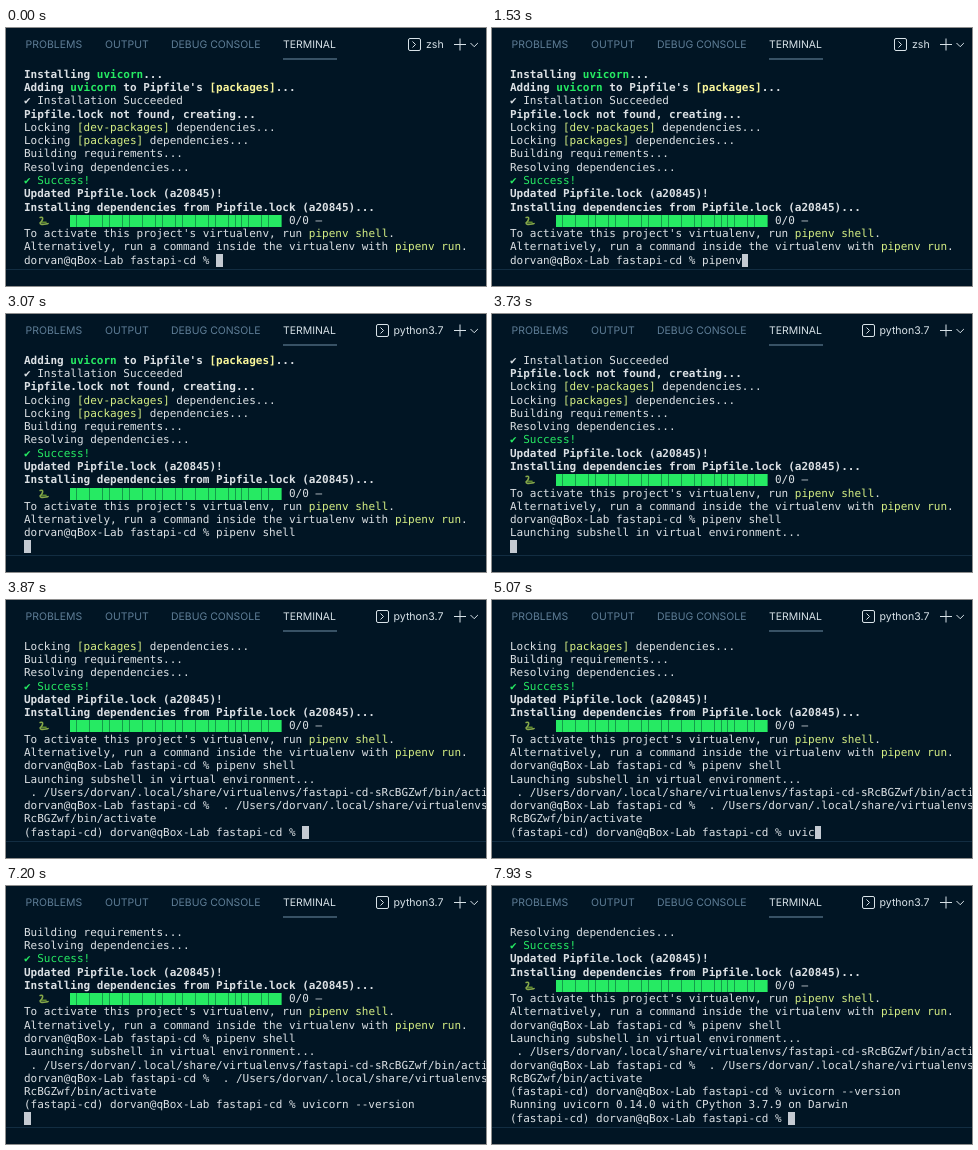
Recreate the animation shown at these times as an HTML page. Size 480 by 258 pixels, loop 8 s.

```html
<!DOCTYPE html>
<html lang="en">
<head>
<meta charset="utf-8">
<title>Terminal</title>
<style>
  html, body { margin: 0; width: 100%; height: 100%; overflow: hidden; background: #011524; }
  #stage {
    position: relative; width: 480px; height: 258px; overflow: hidden;
    background: #011524; color: #dbe0e4; text-rendering: geometricPrecision;
  }
  .tab, #shell {
    position: absolute; top: 9.5px; line-height: 14px; white-space: nowrap;
    font-family: Inter, "Open Sans", sans-serif; font-size: 10.45px; color: #5f7e97;
  }
  .tab.on, #shell { color: #d8e2e8; }
  #shell { font-size: 10.6px; }
  #icons { position: absolute; left: 0; top: 0; fill: none; stroke: #d8e2e8; }
  #screen {
    position: absolute; left: 18px; top: 39.7px; margin: 0;
    font: 11px/13.29px "DejaVu Sans Mono", monospace;
  }
  #screen div { height: 13.29px; white-space: pre; }
  i { font-style: normal; color: #26ea63; }
  u { text-decoration: none; color: #d5ee84; }
  b u { color: #f8f59a; }
  .bar, .snake, .cursor { display: inline-block; vertical-align: top; }
  .bar {
    width: 32ch; height: 12px; margin-top: 1px;
    background: repeating-linear-gradient(90deg, #26ea63 0 calc(1ch - .7px), #149a4a 0 1ch);
  }
  .snake { width: 2ch; height: 13px; }
  .cursor { width: 1ch; height: 13.29px; background: #c4cad2; }
  #rule { position: absolute; left: 0; top: 241px; width: 480px; height: 1px; background: #122d42; }
</style>
</head>
<body>
<div id="stage">
  <span class="tab" style="left:19.6px">PROBLEMS</span>
  <span class="tab" style="left:99px">OUTPUT</span>
  <span class="tab" style="left:165px">DEBUG CONSOLE</span>
  <span class="tab on" style="left:277px">TERMINAL</span>
  <svg id="icons" width="480" height="40">
    <path d="M277 31H331" stroke="#6f8ea6"/>
    <g id="box"><rect x=".5" y="10.5" width="12" height="12" rx="1.5"/><path d="M4.5 13.5l3 3-3 3"/></g>
    <path d="M448 16.5H460M454 10.5V22.5M464.5 15l3.7 3.7 3.7-3.7"/>
  </svg>
  <span id="shell"></span>
  <div id="screen"></div>
  <div id="rule"></div>
</div>
<script>
const LOOP = 8000, ROWS = 15;
const $ = id => document.getElementById(id);
const bold = s => `<b>${s}</b>`;
const green = s => `<i>${s}</i>`;
const yellow = s => `<u>${s}</u>`;

const prompt = 'dorvan@qBox-Lab fastapi-cd % ';
const envs = ' . /Users/dorvan/.local/share/virtualenvs/fastapi-cd-s';
const wrapped = 'RcBGZwf/bin/activate';
const snake = `<svg class="snake" viewBox="0 0 13 13" fill="none" stroke-linecap="round">
<path d="M3 3.5Q6 2.5 5.5 5T3 9Q3 10.8 7 10.3T11 9.5" stroke="#86a84a" stroke-width="1.6"/>
<path d="M5.5 8.3H9" stroke="#5f8a2e" stroke-width="1.4"/></svg>`.replace(/\n/g, '');

const start = [
  bold(`Installing ${green('uvicorn')}...`),
  bold(`Adding ${green('uvicorn')} to Pipfile's ${yellow('[packages]')}...`),
  '✔ Installation Succeeded',
  bold('Pipfile.lock not found, creating...'),
  `Locking ${yellow('[dev-packages]')} dependencies...`,
  `Locking ${yellow('[packages]')} dependencies...`,
  'Building requirements...',
  'Resolving dependencies...',
  green('✔ Success!'),
  bold('Updated Pipfile.lock (a20845)!'),
  bold('Installing dependencies from Pipfile.lock (a20845)...'),
  `  ${snake}   <span class="bar"></span> 0/0 —`,
  `To activate this project's virtualenv, run ${yellow('pipenv shell')}.`,
  `Alternatively, run a command inside the virtualenv with ${yellow('pipenv run')}.`,
  prompt
].join('\n');

// Each event appends text to the terminal at its time.
const type = (text, times) => times.map((t, i) => [t, text[i]]);
const events = [
  ...type('pipenv', [730, 870, 1000, 1130, 1330, 1470]),
  ...type(' shell', [1800, 1930, 2000, 2130, 2200, 2330]),
  [2530, '\n'],
  [3730, 'Launching subshell in virtual environment...\n'],
  [3800, `${envs}${wrapped}\n${prompt}`],
  [3865, `${envs}\n${wrapped}\n(fastapi-cd) ${prompt}`],
  ...type('uvicorn', [4670, 4870, 5000, 5070, 5200, 5330, 5530]),
  ...type(' --v', [5730, 6000, 6130, 6330]),
  ...type('ersion', [6470, 6600, 6730, 6870, 6930, 7000]),
  [7200, '\n'],
  [7400, `Running uvicorn 0.14.0 with CPython 3.7.9 on Darwin\n(fastapi-cd) ${prompt}`]
];

let shown;
function draw(t) {
  const python = t >= 2670;
  const text = start + events.filter(e => e[0] <= t).map(e => e[1]).join('');
  const key = text + python;
  if (key === shown) return;
  shown = key;
  const lines = (text + '<span class="cursor"></span>').split('\n').slice(-ROWS);
  $('screen').innerHTML = lines.map(s => `<div>${s}</div>`).join('');
  $('shell').textContent = python ? 'python3.7' : 'zsh';
  $('shell').style.left = python ? '387.5px' : '420px';
  $('box').setAttribute('transform', `translate(${python ? 370 : 402})`);
}

function frame() {
  draw(performance.now() % LOOP);
  requestAnimationFrame(frame);
}
frame();
</script>
</body>
</html>
```
